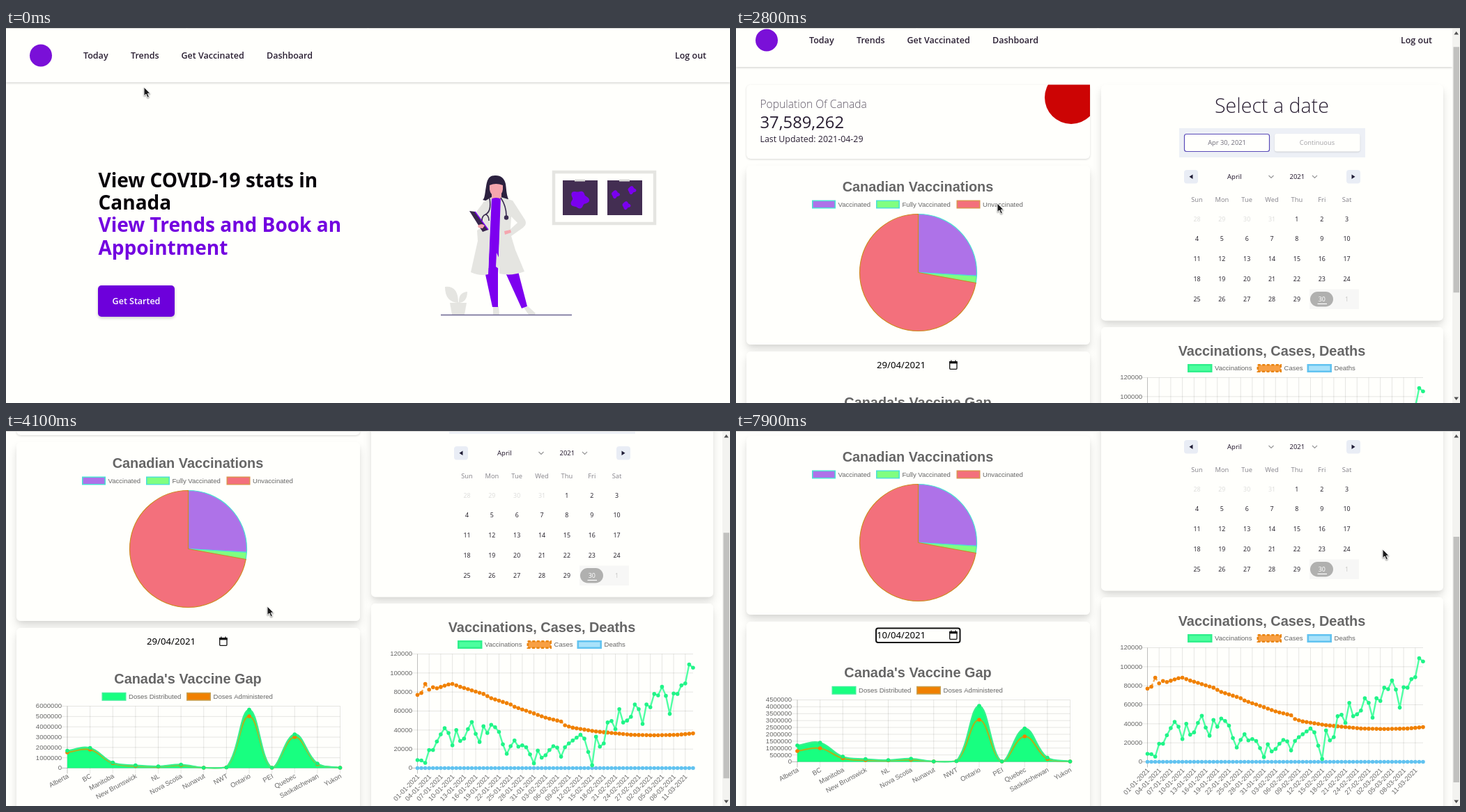
An HTML page with a canvas for the animation above (8000 ms loop, 1039 px wide and 539 px high).

```html
<!DOCTYPE html>
<html lang="en">
<head>
<meta charset="utf-8">
<title>Vaccination trends</title>
<style>
html, body { margin: 0; width: 100%; height: 100%; overflow: hidden; background: #fffffb; }
canvas { display: block; }
</style>
</head>
<body>
<canvas id="stage" width="1039" height="539"></canvas>
<script>
const ctx = document.getElementById('stage').getContext('2d');
const LOOP = 8000, STEP = 100;
const UI = '"Noto Sans", "Open Sans", sans-serif';
const OPEN = '"Open Sans", "Noto Sans", sans-serif';
const CHART = '"Liberation Sans", Arial, sans-serif';
const PAPER = '#fffffc', INK = '#2a1f33', PURPLE = '#6d00db', GREY = '#e5e5e1';
const GREEN = '#18ff80', ORANGE = '#f08000', BLUE = '#62c3f0';

const CURSOR = [
  [0, 198, 85], [100, 198, 78], [400, 203, 41], [1000, 203, 41], [1600, 267, 135],
  [1900, 375, 252], [4300, 375, 252], [4900, 280, 294], [5100, 294, 285], [5200, 306, 288],
  [5500, 306, 288], [6200, 336, 398], [7500, 336, 398], [7900, 928, 170]
];
const SCROLL = [
  [2700, 0], [2800, 22], [2900, 57], [3000, 78], [3100, 85], [3700, 85],
  [3800, 88], [3900, 128], [4000, 175], [4100, 204], [4200, 213]
];
// Thousands per day.
const DOSES = [
  8.4, 8, 5.5, 19, 19, 28, 35.5, 42, 37, 24, 40, 28.5, 31, 41, 48.5, 36, 27.5, 44, 37, 45.5,
  43, 38, 25, 15, 23, 29, 22.5, 24, 22, 14.5, 5, 18.5, 11, 13.5, 19, 23, 21.5, 12, 22, 26,
  29, 32, 35, 31, 17, 3, 33, 22.5, 26, 48, 49.5, 41, 62, 48, 50, 54, 67, 62, 46.5, 67,
  64, 78, 76.5, 85.5, 76, 57, 78.5, 78, 87, 89, 109, 105.5
];
const CASES = [
  [0, 77], [1, 79], [2, 88.5], [3, 82.5], [4, 85], [5, 84], [8, 88], [9, 88.5], [11, 85.5],
  [15, 80.5], [17, 78], [19, 73.5], [24, 67], [25, 64.5], [30, 57.5], [33, 53], [37, 49],
  [38, 45], [40, 42.5], [46, 38.5], [50, 37], [55, 35], [61, 34.5], [67, 35], [71, 36.5]
];
const REGIONS = ['Alberta', 'BC', 'Manitoba', 'New Brunswick', 'NL', 'Nova Scotia', 'Nunavut',
  'NWT', 'Ontario', 'PEI', 'Quebec', 'Saskatchewan', 'Yukon'];
// Heights above the axis in pixels, before and after the date change.
const SENT = [
  [25, 29, 8, 4, 2.5, 5, .5, 1, 84, .5, 48.5, 6.5, .5],
  [23.5, 27.5, 7.5, 4, 2.5, 4.5, .5, 1, 80.5, .5, 48, 6, .5]
];
const USED = [
  [22.5, 26.5, 7, 3, 2, 4, .5, 1, 74.5, .5, 44.5, 5.5, .5],
  [15.5, 19.5, 5, 2.5, 2, 3, .5, 1, 60.5, .5, 36.5, 4, .5]
];

function track(keys, t, i = 1) {
  let a = keys[0];
  for (const b of keys) {
    if (t <= b[0]) return b === a ? a[i] : a[i] + (b[i] - a[i]) * (t - a[0]) / (b[0] - a[0]);
    a = b;
  }
  return a[i];
}
const outQuart = t => 1 - (1 - Math.min(1, Math.max(0, t))) ** 4;

// y is the middle of the capitals.
function text(s, x, y, size, color = INK, { weight = 400, font = UI, align = 'left' } = {}) {
  ctx.font = `${weight} ${size}px ${font}`;
  ctx.fillStyle = color;
  ctx.textAlign = align;
  ctx.fillText(s, x, y + size * .36);
}
const centred = (s, x, y, size, color) => text(s, x, y, size, color, { align: 'center' });
const strong = (s, x, y, color, align) => text(s, x, y, 12.5, color, { weight: 600, font: OPEN, align });
const label = (s, x, y, align, color = '#666') => text(s, x, y, 9.55, color, { font: CHART, align });
const title = (s, x, y) => text(s, x, y, 19.9, '#666', { weight: 700, font: CHART, align: 'center' });

function rect(x, y, w, h, fill, r = 0, stroke, lw = 1) {
  ctx.beginPath();
  ctx.roundRect(x, y, w, h, r);
  if (fill) { ctx.fillStyle = fill; ctx.fill(); }
  if (stroke) { ctx.strokeStyle = stroke; ctx.lineWidth = lw; ctx.stroke(); }
}
function shadowed(dy, blur, alpha, draw) {
  ctx.save();
  ctx.shadowColor = `rgba(0,0,0,${alpha})`;
  ctx.shadowOffsetY = dy;
  ctx.shadowBlur = blur;
  draw();
  ctx.restore();
}
function path(d, fill, stroke, lw = 1) {
  const p = new Path2D(d);
  if (fill) { ctx.fillStyle = fill; ctx.fill(p); }
  if (stroke) { ctx.strokeStyle = stroke; ctx.lineWidth = lw; ctx.stroke(p); }
}
function dot(x, y, r, fill) {
  ctx.beginPath();
  ctx.arc(x, y, r, 0, 7);
  ctx.fillStyle = fill;
  ctx.fill();
}
function line(x1, y1, x2, y2, color = 'rgba(0,0,0,.1)', lw = 1) {
  ctx.beginPath();
  ctx.moveTo(x1, y1);
  ctx.lineTo(x2, y2);
  ctx.strokeStyle = color;
  ctx.lineWidth = lw;
  ctx.stroke();
}
function card(x, y, w, h, big = true) {
  const body = () => rect(x, y, w, h, PAPER, 6);
  if (big) shadowed(8, 13, .12, body);
  shadowed(big ? 3 : 1, big ? 5 : 3, big ? .04 : .16, body);
}
function slanted(s, x, y, angle) {
  ctx.save();
  ctx.translate(x, y);
  ctx.rotate(angle);
  label(s, 0, 0, 'right');
  ctx.restore();
}
function legend(s, x, y, w, fill, border, lw, dash = []) {
  ctx.setLineDash(dash);
  rect(x + lw / 2, y - 6 + lw / 2, w - lw, 12 - lw, fill, 0, border, lw);
  ctx.setLineDash([]);
  label(s, x + w + 3.5, y);
}

function header(x0, width, hover) {
  shadowed(1, 3, .2, () => rect(0, -4, width, 82, PAPER));
  dot(x0 + 50, 39.5, 16, '#7a10d8');
  [['Today', 111], ['Trends', 179], ['Get Vaccinated', 251.5], ['Dashboard', 374]].forEach(([s, x]) =>
    strong(s, x0 + x, 39.5, hover && s === 'Trends' ? PURPLE : INK));
  strong('Log out', x0 + 1005, 39.5, INK, 'right');
}

function blob(x, y, r, spikes) {
  ctx.beginPath();
  for (let i = 0; i <= 60; i++) {
    const a = i / 60 * Math.PI * 2, k = r * (1 + .13 * Math.sin(a * spikes + 1) + .1 * Math.cos(a * 3));
    ctx.lineTo(x + k * Math.cos(a), y + k * Math.sin(a));
  }
  ctx.fillStyle = '#7a00ee';
  ctx.fill();
}

function doctor() {
  const skin = '#f5a6ae', dark = '#2c213f', violet = '#7d00ef';
  // Wall panel
  rect(786, 207, 145, 74, PAPER, 0, GREY, 4.5);
  for (const x of [799, 863]) {
    rect(x, 219, 50, 50, '#432e52');
    rect(x + 17, 217.5, 15, 3, '#d9d9d6');
  }
  blob(822.5, 246.5, 12, 5);
  blob(874.5, 239, 5.3, 4);
  blob(898, 233, 5.3, 4);
  blob(890, 255, 5.3, 4);
  // Plant
  path('M637 395H661L658 412H640Z', GREY);
  path('M630 372Q649 370 649 395Q630 394 630 372M662 379Q649 380 650 395Q662 394 662 379', GREY);
  path('M645 388L649 396M657 386L649 396', null, GREY, 1.5);
  // Legs and shoes
  path('M699 400H707L708 412H699ZM743 402L749 400L760 410L759 412H750Z', GREY);
  path('M686 345H706V401H698ZM716 350L735 350L748 400L740 403Z', violet);
  // Hair, head and body
  path('M703 212C689 211 690 225 688 234C687 242 686 246 684 247Q694 250 702 247Q714 250 721 246C718 239 718 230 717 224Q714 212 703 212', dark);
  path('M697 230H711V246H697Z', skin);
  path('M694 226Q703 222 713 226V232Q712 241 704 242Q695 241 694 232Z', skin);
  path('M696 246Q703 242 711 246L706 352H692Z', violet);
  path('M697 243L685 250L679 265L686 284L676 291L677 306L667 351Q680 357 692 354Z', GREY);
  path('M710 243L727 248L745 276Q748 282 742 287L725 299L731 319L744 350Q725 357 708 353L707 325Z', GREY);
  path('M725 271L734 280L724 289Z', PAPER);
  path('M704 323L709 334L707 346L703 343Z', GREY);
  path('M685 251L672 268L679 275L688 272Z', GREY);
  // Hands, tablet, stethoscope
  path('M665 263L673 264L692 290L684 293Z', '#38264c');
  path('M673 264L692 290', null, violet, 1.5);
  path('M677 284Q683 280 687 284L684 288L678 287ZM715 292L724 290L725 294L716 297Z', skin);
  path('M694 245Q697 264 688 268Q683 270 683 277M688 268Q693 269 693 277M710 244Q718 256 718 270', null, '#3a2c50', 1.6);
  dot(718, 272.5, 3.2, '#3a2c50');
  line(624, 412.5, 812, 412.5, '#6a6490', 1.3);
}

function home(hover) {
  header(0, 1039, hover);
  ['View COVID-19 stats in', 'Canada', 'View Trends and Book an', 'Appointment'].forEach((s, i) =>
    text(s, 132.5, 218.8 + i * 32.3, 28, i < 2 ? '#070309' : '#7300e0', { weight: 700 }));
  shadowed(2, 4, .2, () => rect(132, 370, 110, 45, PURPLE, 5));
  strong('Get Started', 187, 392.5, '#fff', 'center');
  doctor();
}

function pie(k) {
  const x = 261.5, y = 373.5, turn = d => (d * k - 90) * Math.PI / 180;
  const slices = [[0, 93.3, '#ae72e8', '#4ce0d4'], [93.3, 100.3, '#80ff80', '#4ce0d4'], [100.3, 360, '#f3707c', '#cf8a24']];
  for (const [from, to, fill, border] of slices) {
    ctx.beginPath();
    ctx.moveTo(x, y);
    ctx.arc(x, y, 84, turn(from), turn(to));
    ctx.closePath();
    ctx.fillStyle = fill;
    ctx.fill();
    ctx.strokeStyle = border;
    ctx.lineWidth = 1.2;
    ctx.stroke();
  }
}

function pieCard(k) {
  card(15, 220, 493, 257);
  title('Canadian Vaccinations', 261, 249.5);
  legend('Vaccinated', 109, 275.5, 34, '#ae72e8', '#4ce0d4', 1.6);
  legend('Fully Vaccinated', 201, 275.5, 34, '#80ff80', '#4ce0d4', 1.6);
  legend('Unvaccinated', 316.5, 275.5, 34, '#f3707c', '#dc9150', 1.6);
  if (k > 0) pie(k);
}

function population() {
  card(15, 103.5, 493, 106.5, false);
  text('Population Of Canada', 34.5, 131, 15.6, '#5d5565', { weight: 300, font: OPEN });
  text('37,589,262', 34.5, 157.5, 23.8, INK, { font: OPEN });
  text('Last Updated: 2021-04-29', 34.5, 181.5, 12.4, INK, { font: OPEN });
  ctx.save();
  ctx.beginPath();
  ctx.rect(15, 103.5, 493, 106);
  ctx.clip();
  dot(481, 122, 38, '#cc0404');
  ctx.restore();
}

function calendarCard() {
  card(524, 103.5, 491, 339);
  text('Select a date', 769, 134, 28.6, INK, { weight: 300, font: OPEN, align: 'center' });
  rect(636, 166, 267, 42, '#edf0f6');
  rect(643.5, 174.5, 122, 25, PAPER, 3, '#5a4bb8', 1.2);
  shadowed(1, 2, .15, () => rect(773, 174, 122.5, 25.5, PAPER, 3));
  centred('Apr 30, 2021', 704.5, 187, 9.3, '#777480');
  centred('Continuous', 834, 187, 9.3, '#a9a8ac');
  for (const [x, d] of [[643, -1], [876, 1]]) {
    rect(x, 226, 20, 19.5, '#e9edf5', 4);
    path(`M${x + 10 + 2.5 * d} 235.8L${x + 10 - 2.5 * d} 232.5V239Z`, '#1f1c35');
  }
  text('April', 705, 235.7, 9.5);
  text('2021', 794.5, 235.7, 9.5);
  path('M764.5 234L768 237.5L771.5 234M827 234L830.5 237.5L834 234', null, '#999', 1.2);
  rect(823, 397.5, 71, 28.5, '#f7f7f6');
  rect(824, 401, 33, 21.5, '#b0b0af', 11);
  ['Sun', 'Mon', 'Tue', 'Wed', 'Thu', 'Fri', 'Sat'].forEach((s, i) =>
    centred(s, 661.5 + i * 35.85, 268.5, 9.3, '#8b8990'));
  for (let i = 0; i < 35; i++) {
    const day = i < 4 ? 28 + i : (i - 4) % 30 + 1, x = 661.5 + i % 7 * 35.85, y = 296.3 + Math.floor(i / 7) * 28.9;
    centred(day, x, y, 8.9, i < 4 ? '#dededc' : i === 33 ? '#fff' : i === 34 ? '#c9c9c7' : '#2b2730');
  }
  line(834.5, 418.5, 848, 418.5, '#fff', 1.2);
}

function spline(points, base) {
  const cap = y => Math.min(base, Math.max(base - 89, y));
  const handle = (i, dir) => {
    const p = points[i], a = points[Math.max(0, i - 1)], b = points[Math.min(points.length - 1, i + 1)];
    const da = Math.hypot(p.x - a.x, p.y - a.y), db = Math.hypot(b.x - p.x, b.y - p.y);
    const k = dir * .4 * (dir > 0 ? db : da) / (da + db);
    return [p.x + k * (b.x - a.x), cap(p.y + k * (b.y - a.y))];
  };
  ctx.lineTo(points[0].x, points[0].y);
  for (let i = 1; i < points.length; i++)
    ctx.bezierCurveTo(...handle(i - 1, 1), ...handle(i, -1), points[i].x, points[i].y);
}

function gapCard(date, k, updated) {
  const x0 = 88, x1 = 479.5, base = 688.5, top = 599.5, step = (x1 - x0) / 12;
  card(15, 487, 493, 300);
  text(date, 202, 506.7, 13.2, '#000');
  rect(306.7, 502, 10.3, 10.3, null, 1, '#111', 1.3);
  rect(306, 501, 11.7, 3.3, '#111');
  line(308.8, 499.5, 308.8, 502, '#111', 1.3);
  line(315, 499.5, 315, 502, '#111', 1.3);
  title("Canada's Vaccine Gap", 261, 560);
  legend('Doses Distributed', 137.5, 585.7, 35, GREEN, '#40f09a', 1.5);
  legend('Doses Administered', 259, 585.7, 35, ORANGE, '#c8a050', 1.5);

  const rows = updated ? 9 : 6, unit = updated ? 500000 : 1000000;
  for (let i = 0; i <= rows; i++) {
    const y = base - i * (base - top) / rows;
    line(x0 - 8, y, x1, y, i ? undefined : 'rgba(0,0,0,.25)');
    label(i * unit, 80, y - .5, 'right');
  }
  REGIONS.forEach((s, i) => {
    line(x0 + i * step, top, x0 + i * step, base + 8, i ? undefined : 'rgba(0,0,0,.25)');
    slanted(s, x0 + i * step + 1, base + 10.5, -.5);
  });

  const place = ([from, to]) => from.map((h, i) => ({ x: x0 + i * step, y: base - h - (to[i] - h) * k }));
  const sent = place(SENT), used = place(USED);
  const stroke = (pts, color) => {
    ctx.beginPath();
    spline(pts, base);
    ctx.strokeStyle = color;
    ctx.lineWidth = 2.2;
    ctx.stroke();
  };
  ctx.beginPath();
  ctx.moveTo(x0, base);
  spline(sent, base);
  ctx.lineTo(x1, base);
  ctx.fillStyle = GREEN;
  ctx.fill();
  stroke(used, '#a8b420');
  stroke(sent, '#38f08c');
  used.forEach(p => dot(p.x, p.y, 2.8, ORANGE));
  sent.forEach(p => dot(p.x, p.y, 2.8, '#18f07c'));
}

function trendCard() {
  const x0 = 590.5, base = 688.5, top = 524.5, day = 5.57;
  card(524, 452, 491, 335);
  title('Vaccinations, Cases, Deaths', 769, 485.5);
  legend('Vaccinations', 648, 511, 35.5, '#4cff9e', '#30f08c', 2.6);
  legend('Cases', 747.5, 511, 35.5, '#f8a044', '#e88410', 2.6, [4, 2.5]);
  legend('Deaths', 819.5, 511, 35.5, '#a9e2fa', BLUE, 2.6);
  for (let v = 0; v <= 6; v++) {
    const y = base - v * (base - top) / 6;
    line(x0 - 8, y, 986, y, v ? undefined : 'rgba(0,0,0,.25)');
    label(v * 20000, 583, y - .5, 'right');
  }
  for (let i = 0; i < 24; i++) {
    const x = x0 + i * 3 * day, d = new Date(Date.UTC(2021, 0, 1 + i * 3));
    const [y, m, dd] = d.toISOString().slice(0, 10).split('-');
    line(x, top, x, base + 8, i ? undefined : 'rgba(0,0,0,.25)');
    slanted(`${dd}-${m}-${y}`, x + 1, base + 10.5, -.8);
  }
  const series = (value, stroke, fill, dash = []) => {
    const pts = DOSES.map((_, i) => [x0 + i * day, base - value(i) * (base - top) / 120]);
    ctx.beginPath();
    pts.forEach(p => ctx.lineTo(...p));
    ctx.setLineDash(dash);
    ctx.strokeStyle = stroke;
    ctx.lineWidth = 2.4;
    ctx.lineJoin = 'round';
    ctx.stroke();
    ctx.setLineDash([]);
    ctx.lineJoin = 'miter';
    pts.forEach(p => dot(...p, 2.8, fill));
  };
  series(() => 0, '#a0dcf6', BLUE);
  series(i => track(CASES, i), '#f8a850', ORANGE, [4, 3]);
  series(i => DOSES[i], '#50ffa4', '#20f488');
}

function scrollbar(scroll) {
  rect(1028, 0, 11, 539, '#f3f3f0');
  rect(1029.5, 13 + scroll * .653, 8.5, 353, '#c1c1bf');
  path('M1033.7 5L1037 9.5H1030.4Z', scroll ? '#505050' : '#a5a5a3');
  path('M1033.7 535L1037 530.5H1030.4Z', '#505050');
}

function popup(picked) {
  shadowed(2, 12, .3, () => rect(201.5, 305, 174.5, 224.5, '#fff', 2));
  rect(201.5, 305, 174.5, 224.5, PAPER, 2, '#b5b5b5');
  text('April 2021', 210, 322.5, 9.6, '#111', { weight: 700, font: CHART });
  path('M258.5 321H265L261.7 325Z', '#111');
  path('M330.5 329V318M325.5 323L330.5 318L335.5 323', null, '#444', 1.2);
  path('M356 318V329M351 324L356 329L361 324', null, '#c4c4c4', 1.2);
  const colX = i => 221 + i * 22.5;
  [...'MTWTFSS'].forEach((s, i) => label(s, colX(i), 352, 'center', '#222'));
  const chosen = picked ? 12 : 31;
  const cell = i => [colX(i % 7), 375.8 + Math.floor(i / 7) * 22.5];
  const [cx, cy] = cell(chosen);
  rect(cx - 10.5, cy - 10.5, 21, 21, '#5200d8', 0, '#1c0a50', 1.6);
  const [tx, ty] = cell(32);
  rect(tx - 10.8, ty - 10.8, 21.6, 21.6, null, 1, '#8a8a8a');
  for (let i = 0; i < 42; i++) {
    const day = i < 3 ? 29 + i : (i - 3) % 30 + 1;
    const color = i === chosen ? '#fff' : i < 3 ? '#777' : i > 31 ? '#bbb' : '#222';
    const [x, y] = cell(i);
    label(day, x, y, 'center', color);
  }
  label('Today', 346, 513.5, 'center', '#bbb');
}

function pointer(x, y, hand) {
  ctx.save();
  ctx.translate(x, y);
  ctx.lineJoin = 'round';
  shadowed(1, 2, .35, () => path(hand
    ? 'M0 0Q2 -2 3 1V5L9 7Q11 8 10 11L8 16H1L-4 9Q-4 7 0 9Z'
    : 'M0 0V12.5L3 10L5 15L7.4 14L5.3 9.2H9Z', '#1c1c1c', '#f4f4f4', 1));
  ctx.restore();
}

function trends(t) {
  const scroll = track(SCROLL, t), updated = t >= 6700;
  ctx.save();
  ctx.translate(0, -Math.round(scroll));
  header(-6, 1028, false);
  population();
  pieCard(outQuart((t - 1182) / 1000));
  calendarCard();
  gapCard(t >= 6400 ? '10/04/2021' : '29/04/2021', updated ? outQuart((t - 6600) / 1000) : 0, updated);
  trendCard();
  ctx.restore();
  if (t >= 5300) rect(201, 283.5, 120.5, 20.5, null, 3, '#111', 2);
  if (t >= 5600 && t < 6400) popup(t >= 6200);
  scrollbar(scroll);
}

function render(t) {
  rect(0, 0, 1039, 539, PAPER);
  const overLink = t >= 300 && t < 1100;
  if (t < 1100) home(overLink); else trends(t);
  if (t >= 600 && t < 1800) {
    rect(-5, 521, 134.5, 23, '#dcdcda', [0, 4, 0, 0], '#cfcfcd');
    text('localhost:3000/trends', 3, 530, 11.6, '#3c3c3c');
  }
  line(0, .5, 1039, .5, '#d6d6d3');
  pointer(track(CURSOR, t, 1), track(CURSOR, t, 2), overLink);
}

const start = performance.now();
function tick() {
  const t = (performance.now() - start) % LOOP;
  render(Math.floor(t / STEP) * STEP);
  requestAnimationFrame(tick);
}
tick();
</script>
</body>
</html>
```
